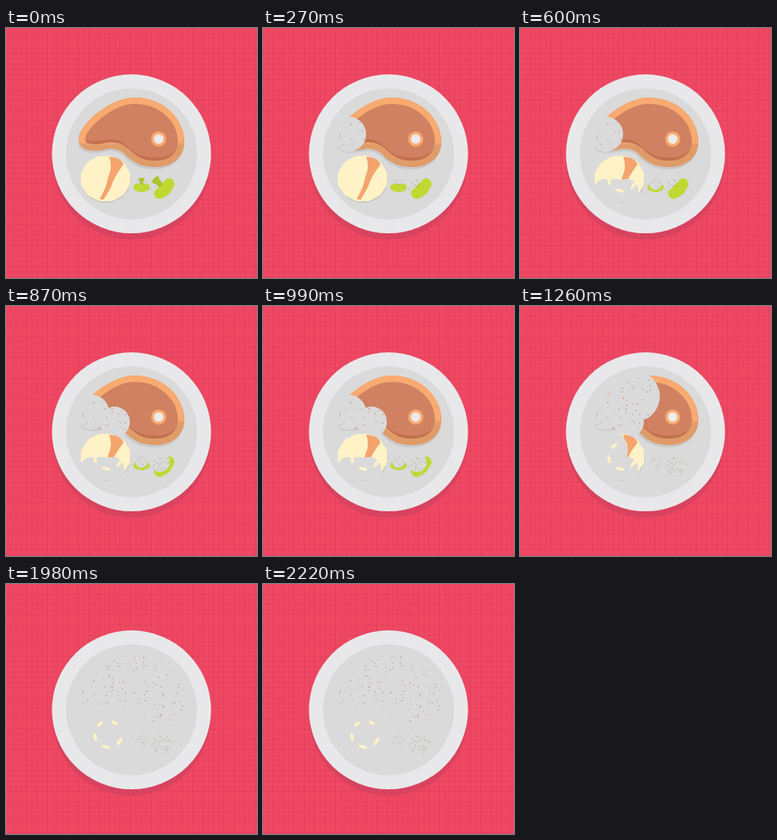
These frames come from a looping animation (314x313 px, 2700 ms). An HTML page with a canvas:

```html
<!DOCTYPE html>
<html lang="en">
<head>
<meta charset="utf-8">
<title>Dinner plate</title>
<style>
html, body { margin: 0; width: 100%; height: 100%; overflow: hidden; background: #ee4863; }
canvas { display: block; width: 314px; height: 313px; }
</style>
</head>
<body>
<canvas id="stage" width="314" height="313"></canvas>
<script>
const W = 314, H = 313, LOOP = 2700;
const CREAM = '#fef2c6', GREEN = '#c0d832', STEM = '#acc42c';
const FAT = '#f9aa70', RIND = '#e09c68', SHADE = '#c9c9c9';
const ctx = document.getElementById('stage').getContext('2d');

function layer(paint) {
  const c = document.createElement('canvas');
  c.width = W;
  c.height = H;
  paint(c.getContext('2d'));
  return c;
}

function ellipse(x, y, rx, ry = rx, tilt = 0) {
  const p = new Path2D();
  p.ellipse(x, y, rx, ry, tilt, 0, Math.PI * 2);
  return p;
}

function fill(g, path, color) {
  g.fillStyle = color;
  g.fill(path);
}

const repeat = (n, make) => Array.from({ length: n }, (_, i) => make(i));

let seed = 41;
function random() {
  seed = (seed * 16807) % 2147483647;
  return seed / 2147483647;
}

// Scatter specks inside a path
function crumbs(g, path, count, colors) {
  for (let n = 0; n < count;) {
    const x = random() * W, y = random() * H;
    if (!g.isPointInPath(path, x, y)) continue;
    const size = 0.7 + random() * 0.6;
    g.fillStyle = colors[n++ % colors.length];
    g.fillRect(x, y, size, size);
  }
}

const steakShape = new Path2D('M91 138C93 119 131 87 161 87C196 87 223 112 223 143' +
  'C223 163 206 174 188 174C171 174 162 170 152 161C145 153 136 149 124 152' +
  'C114 154 107 154 100 152C94 150 91 145 91 138Z');

const table = layer(g => {
  g.fillStyle = '#ee4863';
  g.fillRect(0, 0, W, H);
  for (let i = 0; i * 6.5 < W; i++) {
    g.fillStyle = `rgba(190,38,82,${i % 2 ? 0.1 : 0.2})`;
    const p = Math.round(i * 6.5 - 1);
    g.fillRect(p, 0, 1, H);
    g.fillRect(0, p, W, 1);
  }
  fill(g, ellipse(157, 166, 99), '#d8435f');
  fill(g, ellipse(157, 157.6, 99.5), '#e8e8ea');
  fill(g, ellipse(157, 157.5, 82), '#dadada');

  crumbs(g, steakShape, 135, ['#c9857c', '#cf6a62', '#bcaaa5']);
  crumbs(g, ellipse(169, 197, 8, 9), 24, ['#b9beb0', '#c3bcae']);
  crumbs(g, ellipse(195, 200, 14, 12), 48, ['#a9b788', '#b6b39c']);

  // Potato flakes left in a ring
  for (let i = 0; i < 5; i++) {
    const a = 0.6 + i * 1.15;
    fill(g, ellipse(128 + 17 * Math.cos(a), 188 + 16 * Math.sin(a), 6 - i / 2, 2, a + 1.6), CREAM);
  }
});

const steak = layer(g => {
  g.translate(-1, 3);
  fill(g, steakShape, SHADE);
  g.translate(1, -3);
  g.clip(steakShape);
  fill(g, steakShape, '#cf8161');
  // Dark underside of the meat, then the rim: lit above, shaded below
  g.strokeStyle = '#c2704f';
  g.lineWidth = 5;
  g.translate(0, -9);
  g.stroke(steakShape);
  g.translate(0, 9);
  const rim = g.createLinearGradient(0, 142, 0, 147);
  rim.addColorStop(0, FAT);
  rim.addColorStop(1, RIND);
  g.strokeStyle = rim;
  g.lineWidth = 16;
  g.stroke(steakShape);
  fill(g, ellipse(191, 139, 9.5), FAT);
  fill(g, ellipse(191, 139, 6), '#ececec');
});

const potato = layer(g => {
  fill(g, ellipse(125, 190.5, 31, 28.5), SHADE);
  g.beginPath();
  for (let a = 0; a < Math.PI * 2; a += 0.1) {
    const r = 30.5 + Math.abs(Math.sin(a * 6));
    g.lineTo(124.5 + Math.cos(a) * r, 188.5 + Math.sin(a) * (r - 2.5));
  }
  g.fillStyle = CREAM;
  g.fill();
  fill(g, new Path2D('M129 161Q144 162 147 171Q135 186 131 200L122 215L117 214Q126 200 128 186Q134 174 129 161Z'), '#f4a46d');
});

// A floret whose stem points up before it is turned
function floret(x, y, size, turn, start) {
  const art = layer(g => {
    g.translate(x, y);
    g.rotate(turn);
    g.scale(size, size);
    fill(g, new Path2D('M-4 -11Q0 -13 4 -11L2 -7L3 0H-3L-2 -7Z'), STEM);
    for (let i = -2; i <= 2; i++) fill(g, ellipse(i * 2.8, 1.5 - Math.abs(i) * 0.7, 4.6), GREEN);
  });
  // Each bite reaches deeper from the stem end
  const bites = repeat(3, i => {
    const reach = (10 - 5 * i) * size;
    return [start + 450 * i, x + Math.sin(turn) * reach, y - Math.cos(turn) * reach, (6 + 2 * i * i) * size];
  });
  return { art, bites };
}

// Bites: time, x, y, radius
const steakBites = [
  [107, 133, 22], [136, 145, 19], [143, 113, 32],
  [179, 149, 31], [185, 100, 30], [157, 130, 100]
].map((bite, i) => [200 + 505 * i - 30 * i * i, ...bite]);

const potatoBites = [
  ...repeat(3, i => [450 + 75 * i, 107 + 13 * i, 204, 15]),
  [1005, 110, 180, 25],
  [1410, 125, 190, 40]
];

const foods = [
  { art: steak, bites: steakBites },
  { art: potato, bites: potatoBites },
  floret(169.5, 199.5, 1, 0, 120),
  floret(198, 201, 1.5, -Math.PI / 4, 270)
];

const work = layer(() => {});
const wg = work.getContext('2d');

function draw(t) {
  ctx.drawImage(table, 0, 0);
  for (const { art, bites } of foods) {
    wg.globalCompositeOperation = 'copy';
    wg.drawImage(art, 0, 0);
    wg.globalCompositeOperation = 'destination-out';
    for (const [at, x, y, r] of bites)
      if (t >= at) fill(wg, ellipse(x, y, r), '#000');
    ctx.drawImage(work, 0, 0);
  }
}

const start = performance.now();
function tick() {
  draw((performance.now() - start) % LOOP);
  requestAnimationFrame(tick);
}
tick();
</script>
</body>
</html>
```
